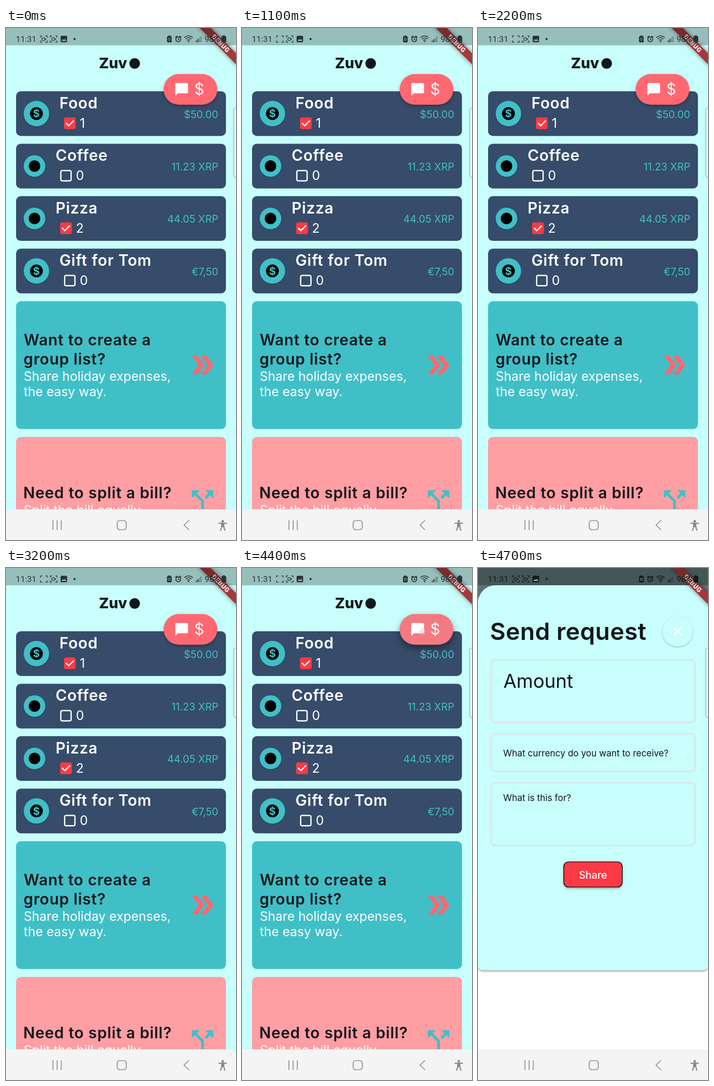
Write an HTML page with a canvas that moves like this. It is 480 px wide and 1068 px high and loops after 5200 ms.

```html
<!DOCTYPE html>
<html lang="en">
<head>
<meta charset="utf-8">
<title>Payment requests</title>
<style>
html, body { margin: 0; width: 100%; height: 100%; overflow: hidden; background: #c8fefb; }
canvas { display: block; width: 480px; height: 1068px; }
</style>
</head>
<body>
<canvas id="stage" width="480" height="1068"></canvas>
<script>
const LOOP = 5200, STEP = 100;
const W = 480, H = 1068, BAR = 36, NAV = 1004;
const MINT = '#c8fefb', NAVY = '#364c6a', TEAL = '#40bfc7', PINK = '#ff9ea3';
const CORAL = '#ff6871', RED = '#fc3a45', INK = '#10181c', GREY = '#85878a';
const ctx = document.getElementById('stage').getContext('2d');

const CHAT = new Path2D('M20 2H4c-1.1 0-2 .9-2 2v18l4-4h14c1.1 0 2-.9 2-2V4c0-1.1-.9-2-2-2z');
const FORK = new Path2D('M14 4l2.29 2.29-2.88 2.88 1.42 1.42 2.88-2.88L20 10V4zM10 4H4v6l2.29-2.29 4.71 4.7V20h2v-8.41l-5.29-5.3z');

const items = [
  { name: 'Food', count: 1, price: '$50.00', coin: true },
  { name: 'Coffee', count: 0, price: '11.23 XRP' },
  { name: 'Pizza', count: 2, price: '44.05 XRP' },
  { name: 'Gift for Tom', count: 0, price: '€7,50', coin: true }
];

const clamp = v => Math.max(0, Math.min(1, v));

function scoped(draw) {
  ctx.save();
  draw();
  ctx.restore();
}

function text(str, x, y, size, color, opt = {}) {
  ctx.font = `${opt.weight || 400} ${size}px ${opt.family || 'Inter'}, sans-serif`;
  ctx.letterSpacing = `${opt.gap || 0}px`;
  ctx.textAlign = opt.align || 'left';
  ctx.fillStyle = color;
  ctx.fillText(str, x, y);
}

const heading = (str, x, y, color) => text(str, x, y, 32, color, { weight: 600, gap: 0.9 });

function box(x, y, w, h, r, fill, stroke, line) {
  ctx.beginPath();
  ctx.roundRect(x, y, w, h, r);
  paint(fill, stroke, line);
}

function disc(x, y, r, fill, stroke, line) {
  ctx.beginPath();
  ctx.arc(x, y, r, 0, Math.PI * 2);
  paint(fill, stroke, line);
}

function paint(fill, stroke, line) {
  if (fill) { ctx.fillStyle = fill; ctx.fill(); }
  if (stroke) { ctx.strokeStyle = stroke; ctx.lineWidth = line; ctx.stroke(); }
}

function poly(points, stroke, line, fill) {
  ctx.beginPath();
  points.forEach(([x, y]) => ctx.lineTo(x, y));
  if (fill) ctx.closePath();
  paint(fill, stroke, line);
}

function icon(path, x, y, scale, color) {
  scoped(() => {
    ctx.translate(x, y);
    ctx.scale(scale, scale);
    ctx.fillStyle = color;
    ctx.fill(path);
  });
}

function shadow(alpha, blur, dy, draw) {
  scoped(() => {
    ctx.shadowColor = `rgba(0,0,0,${alpha})`;
    ctx.shadowBlur = blur;
    ctx.shadowOffsetY = dy;
    draw();
  });
}

function checkbox(x, y, on) {
  if (!on) return box(x + 1.4, y + 1.4, 21.5, 21.5, 3, null, '#fff', 2.7);
  box(x, y, 24.5, 24.5, 4, RED);
  poly([[x + 4, y + 11.5], [x + 9.8, y + 17.3], [x + 20.6, y + 6.5]], '#fff', 2.6);
}

function itemCard({ name, count, price, coin }, i) {
  const y = 132 + i * 109.4, cy = y + 46.5;
  const x = coin ? 113 : 105;
  box(21, y, 438, 93.3, 10, NAVY);
  shadow(0.2, 3, 1, () => disc(coin ? 63.5 : 59.5, cy, coin ? 26.5 : 22.5, TEAL));
  disc(coin ? 63.5 : 59.5, cy, coin ? 13.4 : 12, '#000');
  if (coin) text('$', 63.5, cy + 7.8, 22, TEAL, { weight: 700, align: 'center' });
  heading(name, x - 1.5, y + 36, '#fff');
  checkbox(x + 8, y + 54.6, count > 0);
  text(count, x + 41, y + 76, 26.67, '#fff');
  text(price, 443, y + 55.5, 21.33, TEAL, { align: 'right' });
}

function arrows() {
  for (const x of [388, 407]) {
    poly([[x, 683.5], [x + 11.5, 683.5], [x + 26, 703], [x + 11.5, 722.5], [x, 722.5], [x + 14, 703]],
      null, 0, CORAL);
  }
}

function chatButton(press) {
  const mix = (a, b) => Math.round(a + (b - a) * press);
  const fill = `rgb(${mix(255, 243)},${mix(104, 122)},${mix(113, 128)})`;
  shadow(0.28 + 0.14 * press, 6 + 8 * press, 3 + 4 * press, () => box(329, 96, 112, 64, 32, fill));
  icon(CHAT, 350.6, 112.2, 1.333, '#fff');
  text('$', 393, 139, 32, '#fff');
  if (press) disc(377, 133, 7 * press, `rgba(225,190,205,${0.4 * press})`);
}

function home(press) {
  ctx.fillStyle = MINT;
  ctx.fillRect(0, 0, W, H);
  text('Zuv', 194, 84, 30.5, INK, { weight: 800 });
  disc(268.5, 74, 11, INK);
  items.forEach(itemCard);

  box(21, 570, 438, 266.5, 10, TEAL);
  heading('Want to create a', 37, 662, INK);
  heading('group list?', 36.5, 702, INK);
  text('Share holiday expenses,', 37, 736, 26.67, '#fff');
  text('the easy way.', 37, 768, 26.67, '#fff');
  arrows();

  box(21, 853, 438, 267, 10, PINK);
  heading('Need to split a bill?', 36, 981, INK);
  text('Split the bill equally', 37, 1015, 26.67, '#fff');
  icon(FORK, 376.6, 953, 2.8, TEAL);
  chatButton(press);
}

function sheet(rise) {
  scoped(() => {
    ctx.beginPath();
    ctx.rect(0, 0, W, NAV);
    ctx.clip();
    ctx.translate(0, (1 - rise) * (NAV - BAR));
    ctx.beginPath();
    ctx.roundRect(0, BAR, W, 1100, [37, 37, 0, 0]);
    ctx.clip();
    ctx.fillStyle = '#fff';
    ctx.fillRect(0, BAR, W, H);
    shadow(0.4, 5, 2, () => box(0, BAR, W, 803, [0, 0, 10, 10], MINT));

    text('Send request', 25, 150, 50, INK, { weight: 600, gap: 0.45 });
    shadow(0.28, 3, 1.3, () => disc(416.5, 132, 32, MINT));
    poly([[408.5, 124], [424.5, 140]], '#fff', 3);
    poly([[424.5, 124], [408.5, 140]], '#fff', 3);

    for (const [y, h] of [[191.5, 131], [346, 78.5], [448, 131]]) {
      box(27.2, y, 425.6, h, 9, null, '#e1deea', 2.5);
    }
    text('Amount', 53, 250, 39.6, INK);
    text('What currency do you want to receive?', 52.5, 393, 18.67, INK);
    text('What is this for?', 52.5, 485.5, 18.67, INK);
    poly([[423.5, 384], [428, 388.3], [432.5, 384]], '#fff', 2);

    shadow(0.35, 5, 3, () => box(179, 613, 122, 52.5, 10, RED));
    box(179, 613, 122, 52.5, 10, null, '#14181c', 1.7);
    text('Share', 240, 648, 21.33, '#fff', { weight: 500, align: 'center' });
  });
}

function debugRibbon() {
  scoped(() => {
    ctx.translate(W, 0);
    ctx.rotate(Math.PI / 4);
    shadow(0.5, 10, 0, () => {
      ctx.fillStyle = '#a5383b';
      ctx.fillRect(-60, 37.3, 120, 16);
    });
    text('DEBUG', 0.5, 50, 13.6, '#fff', { weight: 900, family: 'Roboto', align: 'center', gap: 0.6 });
  });
}

function edgeHandle() {
  box(475.3, 167, 20, 144.5, 4, '#d6fffc', '#8ba9aa', 1.2);
}

function recorder(x, color, lens) {
  for (const sx of [-1, 1]) for (const sy of [-1, 1]) {
    poly([[x + sx * 3.5, 23 + sy * 6.5], [x + sx * 7, 23 + sy * 6.5], [x + sx * 7, 23 + sy * 3]], color, 1.3);
  }
  if (!lens) return;
  box(x - 3.8, 20.3, 5.6, 5.6, 1, null, color, 1.3);
  poly([[x + 2, 23], [x + 4.5, 21], [x + 4.5, 25]], null, 0, color);
}

function statusBar(lens, dim) {
  const color = dim > 0.5 ? '#14191a' : '#253334';
  const faint = 'rgba(30,45,46,.45)';
  ctx.fillStyle = 'rgba(0,0,0,.25)';
  ctx.fillRect(0, 0, W, BAR);
  text('11:31', 20.5, 29, 17.2, color, { family: 'Roboto' });
  recorder(79, color, lens);
  recorder(99.5, color, true);
  box(114, 16.3, 13.5, 13.5, 2, color);
  poly([[116, 27], [119, 23], [121, 25.3], [123, 22.5], [126, 27]], null, 0, '#9dbcbb');
  disc(143, 23, 2.3, color);

  box(338.8, 15.5, 4, 3, 1, color);
  box(336, 17, 9.8, 13, 2, color);
  disc(340.9, 23.5, 2.4, null, '#9dbcbb', 1);

  disc(359.5, 23.5, 5, null, color, 1.9);
  poly([[359.5, 20.5], [359.5, 24], [362, 24]], color, 1.4);
  poly([[353.5, 19.5], [357, 16.5]], color, 2);
  poly([[362, 16.5], [365.5, 19.5]], color, 2);

  for (const r of [4, 8, 12]) {
    ctx.beginPath();
    ctx.arc(381, 28.5, r, -Math.PI * 0.76, -Math.PI * 0.24);
    paint(null, color, 1.6);
  }
  disc(381, 28, 1.6, color);
  for (let i = 0; i < 4; i++) {
    ctx.fillStyle = i < 2 ? color : faint;
    ctx.fillRect(396 + i * 3.3, 26.5 - i * 3, 2, 3 + i * 3);
  }
  text('98%', 414.5, 29, 17.2, color, { family: 'Roboto' });
  box(452.3, 15.3, 4.5, 3, 1, color);
  box(449.5, 17, 10, 13, 2, color);
}

function navBar() {
  ctx.fillStyle = '#f4f4f4';
  ctx.fillRect(0, NAV, W, H - NAV);
  for (const x of [98, 106.7, 115.4]) poly([[x, 1027], [x, 1047]], GREY, 1.7);
  box(232, 1027.5, 19, 19, 5.5, null, GREY, 1.7);
  poly([[382, 1027], [371.5, 1037], [382, 1047]], GREY, 1.7);

  disc(452.3, 1028.8, 2.6, GREY);
  poly([[443.5, 1033], [461, 1033]], GREY, 2.4);
  box(449, 1032.5, 6.6, 8.5, 1, GREY);
  poly([[450.3, 1040], [447.6, 1048.5]], GREY, 2.4);
  poly([[454.3, 1040], [457, 1048.5]], GREY, 2.4);
}

function render(t) {
  const press = clamp((t - 4200) / 200);
  const open = clamp((t - 4500) / 200);
  const rise = 1 - (1 - open) ** 3;
  const lens = t < 1100 || t >= 4600;

  home(press);
  if (open) {
    ctx.fillStyle = `rgba(0,0,0,${0.54 * rise})`;
    ctx.fillRect(0, 0, W, H);
    sheet(rise);
  }
  debugRibbon();
  statusBar(lens, open);
  edgeHandle();
  navBar();
}

function tick() {
  const t = performance.now() % LOOP;
  render(Math.floor(t / STEP) * STEP);
  requestAnimationFrame(tick);
}
tick();
</script>
</body>
</html>
```
